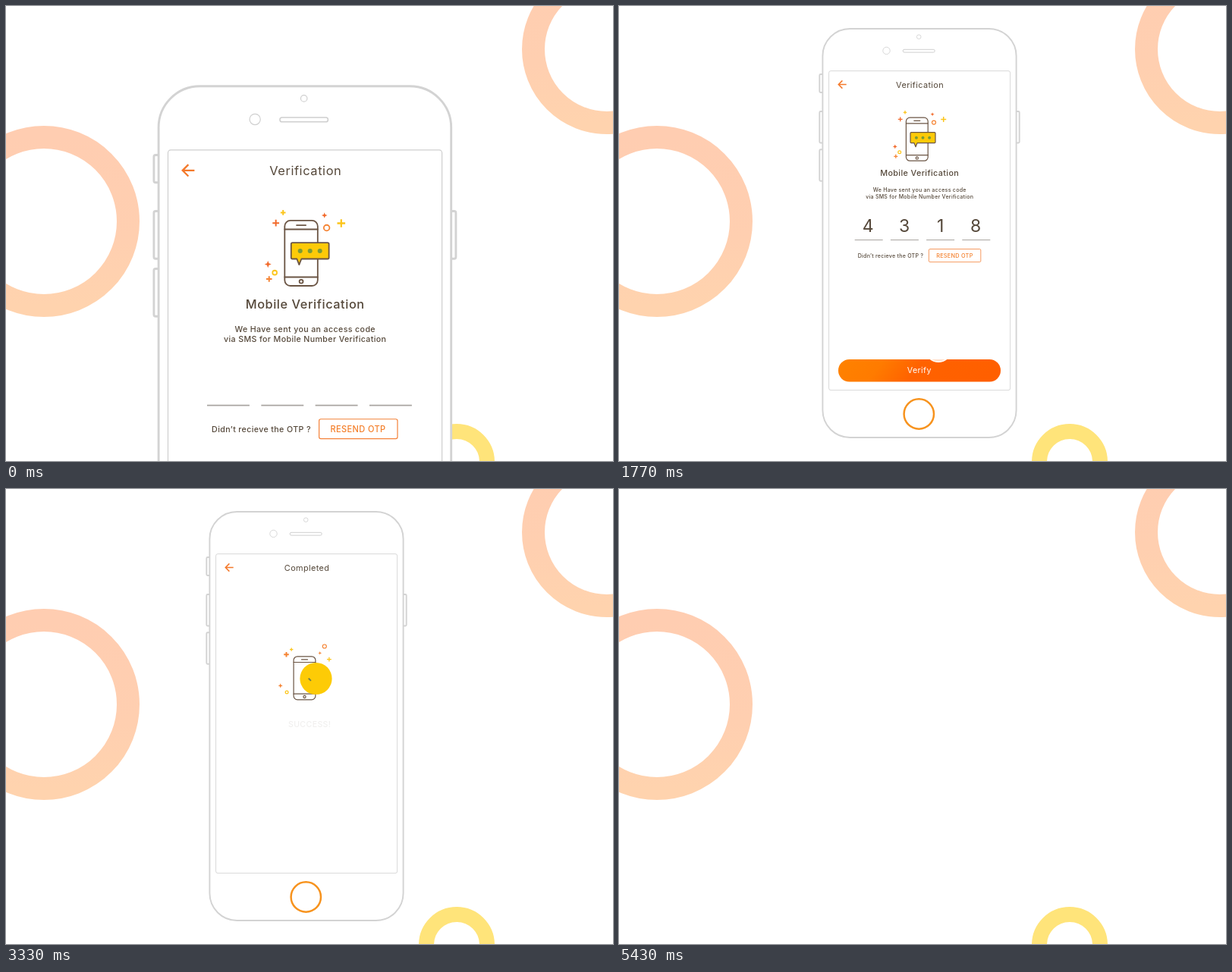
Animation of 800x600 px, one loop 5880 ms. Source, as an HTML page:

```html
<!DOCTYPE html>
<html lang="en">
<head>
<meta charset="utf-8">
<title>Mobile verification</title>
<style>
  html, body { margin: 0; width: 100%; height: 100%; overflow: hidden; background: #fff; }
  svg { display: block; width: 800px; height: 600px; }
  text { font-family: Montserrat, Inter, sans-serif; letter-spacing: .035em; text-anchor: middle; fill: #55483a; }
  .small { font-size: 7.05px; font-weight: 500; }
  .title { font-size: 10.9px; }
  .digit { font-size: 23px; }
  .body { fill: #fff; stroke: #d3d3d3; stroke-width: 1.9; }
  .thin { fill: none; stroke: #cfcfcf; stroke-width: .8; }
  .ink { fill: none; stroke: #6b5544; stroke-width: 1.2; stroke-linecap: round; stroke-linejoin: round; }
</style>
</head>
<body>
<svg viewBox="0 0 800 600">
  <defs>
    <linearGradient id="peach" x1="0" y1="0" x2="0" y2="1">
      <stop offset="0" stop-color="#ffcdb1"/><stop offset=".6" stop-color="#ffcfb0"/><stop offset="1" stop-color="#ffd3ae"/>
    </linearGradient>
    <linearGradient id="fire" x1="0" y1="0" x2="1" y2=".1">
      <stop offset="0" stop-color="#ff8200"/><stop offset=".28" stop-color="#ff7b00"/>
      <stop offset=".52" stop-color="#ff6200"/><stop offset="1" stop-color="#ff5f00"/>
    </linearGradient>
    <clipPath id="buttonClip"><rect x="289" y="466" width="214" height="29.5" rx="14.7"/></clipPath>
  </defs>

  <g fill="none">
    <circle cx="50" cy="284" r="111" stroke="url(#peach)" stroke-width="30"/>
    <circle cx="792" cy="57" r="97" stroke="url(#peach)" stroke-width="30"/>
    <circle cx="594" cy="601" r="40" stroke="#ffe47a" stroke-width="20"/>
  </g>

  <g id="scene">
    <g id="phone">
      <g class="body">
        <rect x="264.3" y="90" width="8" height="24" rx="1.5"/>
        <rect x="264.3" y="139" width="8" height="41.5" rx="1.5"/>
        <rect x="264.3" y="189.3" width="8" height="41.5" rx="1.5"/>
        <rect x="519.7" y="139" width="8" height="41.5" rx="1.5"/>
        <rect x="268.4" y="30" width="255.2" height="539" rx="36"/>
      </g>
      <g class="thin">
        <circle cx="395.2" cy="40.7" r="2.8"/>
        <circle cx="352.5" cy="58.9" r="4.7"/>
        <rect x="374.2" y="57.3" width="42" height="3.8" rx="1.9" stroke-width="1"/>
        <rect x="276.6" y="85.6" width="239" height="421" rx="2.5"/>
      </g>
      <circle cx="395.3" cy="538" r="19.7" fill="none" stroke="#f7931e" stroke-width="2.5"/>
      <path d="M299.7 103.5H289.6M294.4 98.4l-5.1 5.1 5.1 5.1" fill="none" stroke="#f4792b" stroke-width="1.5"/>
      <text id="titleOld" class="title" x="396.6" y="107.8">Verification</text>
      <text id="titleNew" class="title" x="396.6" y="107.8">Completed</text>

      <g id="form">
        <text x="396.2" y="224.1" font-size="10.8" font-weight="500">Mobile Verification</text>
        <text class="small" x="396.2" y="244.6">We Have sent you an access code</text>
        <text class="small" x="396.2" y="253.5">via SMS for Mobile Number Verification</text>
        <path d="M310.7 308.5h37m10.2 0h37m10.2 0h37m10.2 0h37" stroke="#a9a5a1" stroke-width="1.1"/>
        <g id="digits"></g>
        <text class="small" x="358" y="331.9">Didn’t recieve the OTP ?</text>
        <rect x="408.4" y="320.5" width="68.4" height="17.1" rx="1.5" fill="none" stroke="#f4823a" stroke-width=".8"/>
        <text x="442.4" y="331.9" font-size="7.3" font-weight="500" style="fill:#f47f2a">RESEND OTP</text>
        <g id="verify">
          <rect x="289" y="466" width="214" height="29.5" rx="14.7" fill="url(#fire)"/>
          <text x="395.8" y="484" font-size="10.7" style="fill:#fff">Verify</text>
        </g>
        <g clip-path="url(#buttonClip)">
          <circle id="touch" cx="421" r="17.3" fill="#fff" fill-opacity=".8" stroke="#fff" stroke-width="1.4"/>
        </g>
      </g>

      <g id="oldIcon"></g>
      <text id="success" x="400.2" font-size="10.6" font-weight="500">SUCCESS!</text>
      <text id="thanks" class="small" x="396.2">Thanks! Your mobile number is verified.</text>
    </g>
    <g id="newIcon"></g>
  </g>
</svg>

<script>
const LOOP = 5880, STEP = 30;
const ORANGE = '#f58434', RED = '#f26a2b', YELLOW = '#fcc51c';
const $ = id => document.getElementById(id);
const clamp = v => Math.min(1, Math.max(0, v));
const span = (t, a, b) => clamp((t - a) / (b - a));
const mix = (a, b, p) => a + (b - a) * p;
const smooth = p => p * p * (3 - 2 * p);
const back = p => 1 + 2.7 * (p - 1) ** 3 + 1.7 * (p - 1) ** 2;
const fade = (id, o) => $(id).setAttribute('opacity', clamp(o));
const move = (id, v) => $(id).setAttribute('transform', v);

const plus = (x, y, r, c, w = 1.3) =>
  `<path d="M${x - r} ${y}h${2 * r}M${x} ${y - r}v${2 * r}" stroke="${c}" stroke-width="${w}"/>`;
const star = (x, y, r, c) =>
  `<path transform="translate(${x} ${y}) scale(${r})" d="M0-1L.28-.28 1 0 .28.28 0 1-.28.28-1 0-.28-.28z" fill="${c}"/>`;
const ring = (x, y, r, c) =>
  `<circle cx="${x}" cy="${y}" r="${r}" fill="none" stroke="${c}" stroke-width="1.2"/>`;
// Handset outline centred on the origin
const handset = `<g class="ink"><rect x="-14.4" y="-28.5" width="28.8" height="57" rx="5" fill="#fff"/>
  <path d="M-14.4-20.8h28.8M-14.4 20.9h28.8M-4-24.4h8"/><circle cy="24.7" r="1.6"/></g>`;

$('oldIcon').innerHTML = `<g transform="translate(392.8 175.7)">${handset}</g>
  <path class="ink" style="fill:#fdca08" d="M385.2 166.6h30.6q1.2 0 1.2 1.2v11.7q0 1.2-1.2 1.2h-22.8l-2 5-2-5h-3.8q-1.2 0-1.2-1.2v-11.7q0-1.2 1.2-1.2z"/>
  <g fill="#7b9b36">${[391.9, 400.5, 409.1].map(x => `<circle cx="${x}" cy="173.8" r="2"/>`).join('')}</g>`
  + plus(377, 140.3, 2.2, YELLOW) + plus(370.7, 149.4, 2.9, RED) + star(413.1, 142.7, 2.5, RED)
  + ring(415, 153.6, 2.5, ORANGE) + plus(427.7, 149.6, 3.5, YELLOW, 1.5)
  + star(363.8, 185.4, 3, RED) + ring(369.7, 192.7, 1.9, YELLOW) + plus(364.8, 198.3, 2.5, ORANGE);

$('newIcon').innerHTML = handset + '<g id="sparks">'
  + plus(-24, -31, 3.3, ORANGE, 2) + plus(-17.3, -37.7, 2.2, YELLOW) + ring(26.3, -41.8, 2.5, ORANGE)
  + star(20.2, -33, 2.4, ORANGE) + plus(32.4, -24.6, 2.9, YELLOW) + star(-31.8, 10, 3.1, ORANGE)
  + ring(-23.4, 18.7, 1.9, YELLOW) + '</g>'
  + `<circle id="disc" cx="15" cy=".7" fill="#fdcb06"/>
  <path id="check" d="M5.2.3L12.5 7.9 26.4-5.3" fill="none" stroke-width="1.9" pathLength="1" stroke-dasharray="1 2"/>`;

const digitX = [328.6, 376.4, 424, 470.6];
$('digits').innerHTML = [4, 3, 1, 8].map((d, i) => `<text id="digit${i}" class="digit" x="${digitX[i]}">${d}</text>`).join('');

function draw(t) {
  // Camera: 0 shows the whole handset, 1 is close up
  const out = span(t, 0, 420), close = span(t, 4020, 4440);
  const zoom = t < 2000 ? 1 - out : close;
  const lift = t < 2000 ? (1 - out) ** 1.18 : 1 - (1 - close) ** 1.18;
  move('phone', `translate(${mix(396, 393.9, zoom)} ${mix(299.5, 513, lift)}) scale(${mix(1, 1.511, zoom)}) translate(-396 -299.5)`);
  fade('scene', 1 - span(t, 5310, 5430));

  digitX.forEach((_, i) => {
    const p = span(t, 660 + 90 * i, 900 + 90 * i), e = back(p);
    $('digit' + i).setAttribute('y', 298 + 11 * (1 - e));
    fade('digit' + i, p ? e : 0);
  });
  fade('verify', mix(.22, 1, span(t, 930, 1170)));

  // Tap on the button
  const press = 1 - .15 * Math.sin(Math.PI * span(t, 1890, 2010));
  $('touch').setAttribute('cy', mix(445, 480, span(t, 1740, 1890)));
  $('touch').setAttribute('r', 17.3 * press);
  fade('touch', t < 1770 ? 0 : 1 - span(t, 1950, 2070));

  // Form leaves, icon slides to the middle
  fade('form', 1 - span(t, 2010, 2310));
  const swap = span(t, 2100, 2340);
  fade('titleOld', 1 - swap);
  fade('titleNew', swap);
  move('oldIcon', `translate(0 ${73.3 * smooth(span(t, 2040, 2460))})`);
  fade('oldIcon', 1 - span(t, 2520, 2790));

  // Success
  move('newIcon', `translate(${mix(393.5, 388.5, close)} ${mix(249.3, 444.5, close)}) scale(${mix(1, 1.63, close ** 2)})`);
  fade('newIcon', span(t, 2700, 2970));
  move('sparks', `scale(${mix(.6, 1, back(span(t, 2820, 3240)))})`);
  $('disc').setAttribute('r', Math.max(0, 21.1 * back(span(t, 2940, 3300))));
  const drawn = smooth(span(t, 3240, 3600));
  $('check').setAttribute('stroke-dashoffset', 1 - drawn);
  $('check').setAttribute('stroke', `rgb(${mix(112, 118, close)},${mix(125, 172, close)},${mix(75, 50, close)})`);
  fade('check', drawn > 0 ? 1 : 0);
  [['success', 308.2, 3300], ['thanks', 323.3, 3540]].forEach(([id, y, start]) => {
    const p = span(t, start, start + 390);
    $(id).setAttribute('y', y + 8 * (1 - p) ** 3);
    fade(id, p);
  });
}

function tick() {
  draw(Math.floor(performance.now() % LOOP / STEP) * STEP);
  requestAnimationFrame(tick);
}
tick();
</script>
</body>
</html>
```
